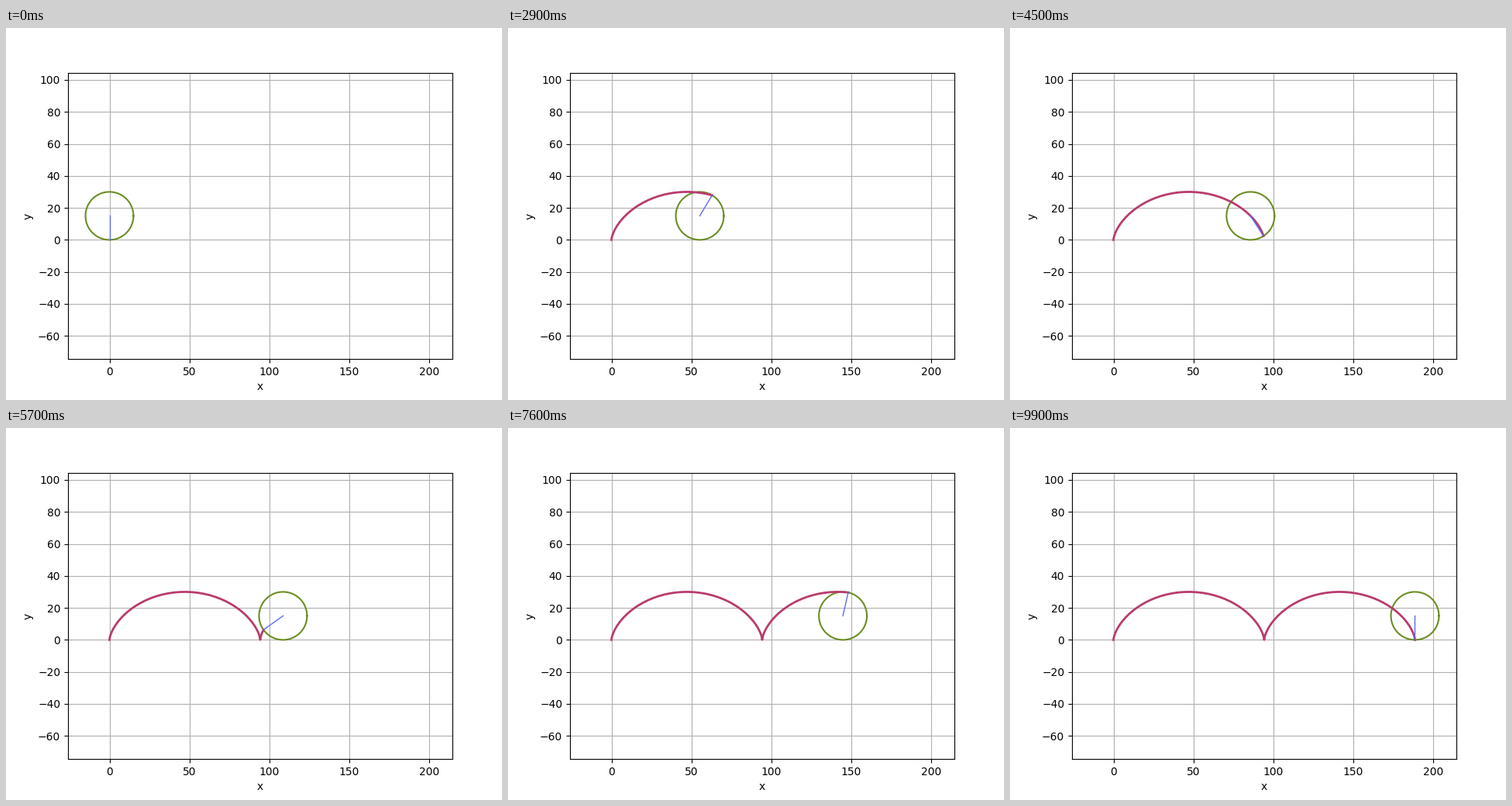
Recreate the animation shown at these times as a matplotlib script. Size 640x480 px, loop 10000 ms.

```python
import matplotlib.pyplot as plt
import numpy as np
from matplotlib.animation import FuncAnimation

R = 15
FRAMES = 100
STEP_MS = 100

theta = np.linspace(0, 4 * np.pi, FRAMES)
centre_x = R * theta
path_x = centre_x - R * np.sin(theta)
path_y = R - R * np.cos(theta)

phi = np.linspace(0, 2 * np.pi, 100)
rim_x = R * np.cos(phi)
rim_y = R + R * np.sin(phi)

fig, ax = plt.subplots(figsize=(6.4, 4.8), dpi=100)
ax.set_xlabel("x")
ax.set_ylabel("y")
ax.grid(True)

# Equal scale on both axes, centred on the wheel's height
span = centre_x[-1] + 2 * R
pad = 0.05 * span
half_h = (span + 2 * pad) * 369.6 / 496 / 2
ax.set_xlim(-R - pad, centre_x[-1] + R + pad)
ax.set_ylim(R - half_h, R + half_h)

wheel, = ax.plot([], [], color="#6b8e23", lw=1.5)
trail, = ax.plot([], [], color="#b93b6e", lw=2)
spoke, = ax.plot([], [], color="#5b6cf0", lw=1)


def update(i):
    wheel.set_data(centre_x[i] + rim_x, rim_y)
    trail.set_data(path_x[:i + 1], path_y[:i + 1])
    spoke.set_data([centre_x[i], path_x[i]], [R, path_y[i]])
    return wheel, trail, spoke


anim = FuncAnimation(fig, update, frames=FRAMES, interval=STEP_MS,
                     repeat=True, repeat_delay=0)
plt.show()
```
